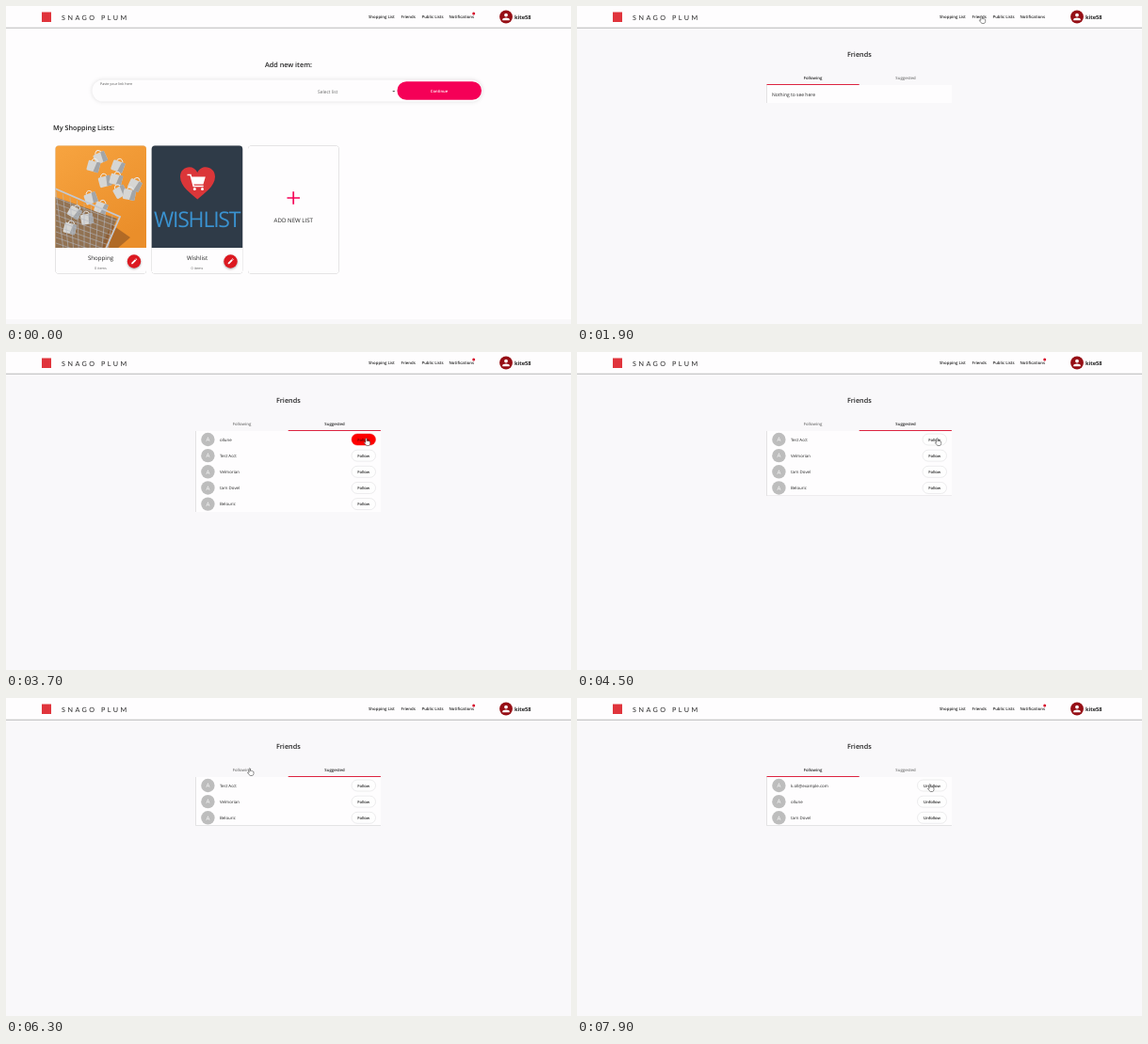
Write an HTML page that moves like this. It is 600 by 338 pixels and loops after 8 s.

```html
<!DOCTYPE html>
<html lang="en">
<head>
<meta charset="utf-8">
<title>Shopping lists</title>
<style>
  html, body { margin: 0; width: 100%; height: 100%; overflow: hidden; }
  svg { display: block; width: 600px; height: 338px; font-family: "Open Sans", sans-serif; fill: #222; text-rendering: geometricPrecision; }
  .brand { font: 7.2px Lato, sans-serif; letter-spacing: 2.5px; }
  .poster { font-stretch: 75%; letter-spacing: -1.2px; }
  .card { fill: #fefdfe; filter: drop-shadow(0 .5px .7px #0006); }
  .soft { fill: #fefdfe; filter: drop-shadow(0 0 2px #0002); }
</style>
</head>
<body>
<svg id="stage" viewBox="0 0 600 338">
  <defs>
    <clipPath id="photo"><path d="M52.500 257V152a3.500 3.500 0 0 1 3.500-3.500h89.500a3.500 3.500 0 0 1 3.500 3.500v105z"/></clipPath>
    <linearGradient id="orange" x2=".6" y2="1"><stop stop-color="#f7a440"/><stop offset="1" stop-color="#ea8e2a"/></linearGradient>
    <linearGradient id="fade" x2="0" y2="1"><stop stop-color="#999"/><stop offset="1" stop-color="#999" stop-opacity="0"/></linearGradient>
  </defs>
  <rect id="back" width="600" height="338"/>
  <g id="home"></g>
  <g id="friends"></g>
  <g id="header"></g>
  <g id="cursor" stroke="#333" stroke-width=".55" stroke-linejoin="round" fill="#fff">
    <path id="arrow" d="M0 0V6L1.4 4.8 2.4 7 3.4 6.5 2.5 4.4H4.3z"/>
    <path id="hand" d="M-.7 .6Q0 -.5 .7 .6V3Q1.6 2.5 2 3.2 2.9 2.8 3.2 3.6 4.2 3.4 4.2 4.3V6Q4 7.8 2.6 8H.6Q-.5 7.6 -2.3 4.8 -2 3.8 -.7 4.8z"/>
  </g>
</svg>
<script>
const $ = id => document.getElementById(id);
const PINK = '#f50057', RED = '#dc1820';

const text = (x, y, size, str, extra = '') => `<text x="${x}" y="${y}" font-size="${size}" ${extra}>${str}</text>`;
const mid = (x, y, size, str, extra = '') => text(x, y, size, str, 'text-anchor="middle" ' + extra);
const rect = (x, y, w, h, r, attrs) => `<rect x="${x}" y="${y}" width="${w}" height="${h}" rx="${r}" ${attrs}/>`;
const circle = (x, y, r, fill) => `<circle cx="${x}" cy="${y}" r="${r}" fill="${fill}"/>`;
const path = (d, attrs) => `<path d="${d}" ${attrs}/>`;
const semi = 'font-weight="600"';

function header() {
  const nav = [[385, 'Shopping List'], [419.5, 'Friends'], [441.5, 'Public Lists'], [470.5, 'Notifications']];
  return rect(0, 22.6, 600, 1.8, 0, 'fill="url(#fade)"') + rect(0, 0, 600, 22.6, 0, 'fill="#fefdfe"') +
    rect(38, 6.5, 10, 10.5, 0, 'fill="#e0343c"') +
    text(59, 14.8, 7.2, 'SNAGO PLUM', 'class="brand"') +
    nav.map(([x, s]) => text(x, 13.3, 4.3, s, semi)).join('') +
    `<g id="badge">${circle(496.7, 8, 1.5, '#d8142c')}</g>` +
    circle(531, 11.5, 6.9, '#960f16') + circle(531, 9.6, 1.9, '#fff') +
    path('M527.3 15.2v-1q0-1.8 3.7-1.8t3.7 1.8v1z', 'fill="#fff"') +
    text(540, 13.7, 5.7, 'kite58', 'font-weight="700"');
}

function photo() {
  const bags = [[100, 161, -25], [93, 170, 15], [119, 170, 20], [105, 186, -15], [117, 184, 15], [137, 190, 25],
    [121, 197, -30], [131, 200, 10], [90, 204, -20], [101, 214, 20], [73, 219, 30], [86, 226, -10], [68, 236, 15]];
  let wires = '';
  for (let i = 0; i < 9; i++) wires += `M${53 + i * 7.5} ${197 + i * 3.2}l${8 - i * 2} 62M53 ${204 + i * 6}L${119 - i * 2} ${229 + i * 5}`;
  return `<g clip-path="url(#photo)">` + rect(52, 148, 97, 110, 0, 'fill="url(#orange)"') +
    path('M52 203L118 226 104 258H52z', 'fill="#6b6462" opacity=".7"') +
    path('M112 232L132 246 118 258H100z', 'fill="#8a5224" opacity=".6"') +
    bags.map(([x, y, a]) => `<g transform="translate(${x} ${y}) rotate(${a})">` +
      path('M-3-4v-2q3-4 6 0v2', 'fill="none" stroke="#eee" stroke-width=".9"') +
      rect(-6.5, -5, 13, 11, 1.5, 'fill="#d6d6d4"') + path('M2.5-5h4V6H1z', 'fill="#a3a5a7"') + '</g>').join('') +
    path(wires, 'fill="none" stroke="#b4b8c0" stroke-width=".8" opacity=".75"') +
    path('M52 194L121 224 106 258', 'fill="none" stroke="#c4c8d0" stroke-width="1.8"') + '</g>';
}

function poster() {
  return path('M154.700 257V152a3.500 3.500 0 0 1 3.500-3.500H247.700a3.500 3.500 0 0 1 3.500 3.500v105z', 'fill="#2f3b48"') +
    path('M203.300 205.500C197 199.500 185 192 185 181.500c0-11 14-14 18.300-4.500C207.600 167.500 222 170.500 222 181.500c0 10.500-12.400 18-18.700 24z', 'fill="#db3639"') +
    path('M192.500 179.500h3.500l3.200 12h10.500', 'fill="none" stroke="#fff" stroke-width="1.500"') +
    path('M196.800 181.500h15l-2.300 8h-11z', 'fill="#fff"') + circle(200.3, 194.5, 1.5, '#fff') + circle(208.5, 194.5, 1.5, '#fff') +
    mid(202.6, 234.5, 23, 'WISHLIST', 'class="poster" fill="#3a92d0"');
}

function home() {
  const card = x => rect(x, 148.5, 96.5, 136, 3.5, 'class="card"');
  const label = (x, name) => mid(x, 270, 6.15, name) + mid(x, 279.7, 3.75, '0 items', 'fill="#666"') +
    `<g transform="translate(${x + 35.5} 271.5)"><g filter="drop-shadow(0 1px 1px #0005)">${circle(0, 0, 7.2, RED)}</g>` +
    path('M-2.800 2.800v-1.300L1-2.300 2.300-1-1.500 2.800zM1.400-2.700l.7-.6 1.200 1.200-.6.7z', 'fill="#fff"') + '</g>';
  return rect(0, 333, 600, 5, 0, 'fill="#f8f7f9"') +
    mid(300, 64.8, 7.25, 'Add new item:', semi) +
    rect(91.5, 78.5, 414, 23, 11.5, 'class="soft"') +
    text(100, 84.2, 3.7, 'Paste your link here', 'fill="#555"') +
    text(331, 93, 4.9, 'Select list', 'fill="#666"') +
    path('M410.200 90h3.200l-1.600 1.600z', 'fill="#555"') +
    rect(415.4, 80.2, 89.6, 19.6, 9.8, `fill="${PINK}"`) + mid(460, 91.5, 4.2, 'Continue', semi + ' fill="#fff"') +
    text(50, 132, 7.25, 'My Shopping Lists:', semi) +
    card(52.5) + card(154.7) + card(257) + photo() + poster() +
    label(100.5, 'Shopping') + label(203, 'Wishlist') +
    path('M298.500 204h13.500M305.200 197.300v13.500', `stroke="${PINK}" stroke-width="1.700"`) +
    mid(305.3, 229.8, 6.15, 'ADD NEW LIST');
}

const people = ['ollune', 'Test Acct', 'Velmorian', 'tarn Dovel', 'Belouric'];
const followed = ['Nella', 'k.oll@example.com', 'ollune', 'tarn Dovel'];
const OPEN = 1790, SUGGEST = 3090, FIRST = 4090, SECOND = 5790, FOLLOWING = 6490, REMOVE = 7890;
const hovers = [[3600, FIRST, 0], [5200, SECOND, 2], [7400, REMOVE, 0]]; // from, to, row

const clamp = v => Math.max(0, Math.min(1, v));
const ease = v => (v = clamp(v), v * v * (3 - 2 * v));

function listAt(t) {
  if (t < SUGGEST) return [];
  if (t < FOLLOWING) return people.filter((_, i) => !(i === 0 && t >= FIRST) && !(i === 3 && t >= SECOND));
  return t < REMOVE ? followed : followed.slice(1);
}

function friends(t) {
  const names = listAt(t), suggested = t >= SUGGEST && t < FOLLOWING;
  const slide = ease((t - SUGGEST) / 300) - ease((t - FOLLOWING) / 300);
  const tab = (x, name, on) => mid(x, 77.5, 4.3, name, `${semi} fill="${on ? '#222' : '#777'}"`);
  const row = (name, i) => {
    const y = 93 + i * 17.15, w = suggested ? 25.5 : 31;
    const hover = hovers.find(([from, to, r]) => r === i && t >= from && t < to);
    const pale = hover ? Math.round(255 * (1 - clamp((t - hover[0]) / 90))) : 254;
    return circle(214.4, y, 7.2, '#bdbdbd') + mid(214.4, y + 2.2, 6.2, 'A', 'fill="#fff"') +
      text(227, y + 1.6, 4.4, name) +
      rect(392.5 - w, y - 6, w, 12, 6, `fill="rgb(254,${pale},${pale})" stroke="${hover ? '#f01414' : '#d8d8da'}" stroke-width=".5"`) +
      mid(392.5 - w / 2, y + 1.5, 4.15, suggested ? 'Follow' : 'Unfollow', `${semi} fill="${hover ? '#500' : '#222'}"`);
  };
  return mid(299.8, 53.6, 7.25, 'Friends', semi) +
    tab(250.5, 'Following', !suggested) + tab(349, 'Suggested', suggested) +
    rect(201.5, 84, 196.5, names.length ? names.length * 17.2 : 19, 0, 'class="card"') +
    rect(201.5 + 98.2 * slide, 83, 98.2, 1, 0, 'fill="#dc2440"') +
    (names.length ? names.map(row).join('') : text(207, 95.6, 5, 'Nothing to see here'));
}

// time, x, y of the pointer tip
const route = [[500, 440, 175], [900, 417, 44], [1000, 415.3, 31], [1300, 429.5, 10.5], [2000, 429.5, 10.5],
  [2600, 386, 86], [2750, 347, 74.5], [3100, 347, 74.5], [3600, 382.5, 91.5], [4850, 382.5, 91.5],
  [5000, 358, 108], [5200, 384, 125.5], [5800, 384, 125.5], [6250, 258.8, 74.5], [6500, 258.8, 74.5],
  [7300, 374.8, 91.5], [8000, 374.8, 91.5]];

function moveCursor(t) {
  const shown = t >= route[0][0];
  $('cursor').style.display = shown ? '' : 'none';
  if (!shown) return;
  const i = route.findIndex(p => p[0] > t), [t0, x0, y0] = route[i - 1], [t1, x1, y1] = route[i];
  const k = ease((t - t0) / (t1 - t0)), x = x0 + (x1 - x0) * k, y = y0 + (y1 - y0) * k;
  const hand = y < 18 || (t > OPEN && y > 66 && y < 83 && x > 201 && x < 398) || (t > SUGGEST && x > 361 && y > 86);
  $('cursor').setAttribute('transform', `translate(${x} ${y})`);
  $('hand').style.display = hand ? '' : 'none';
  $('arrow').style.display = hand ? 'none' : '';
}

$('header').innerHTML = header();
$('home').innerHTML = home();
let drawn;

function frame() {
  const t = performance.now() % 8000, atHome = t < OPEN;
  $('back').setAttribute('fill', atHome ? '#fefdfe' : '#f9f8fa');
  $('home').style.display = atHome ? '' : 'none';
  $('badge').style.display = t >= OPEN && t < 2200 ? 'none' : '';
  const page = atHome ? '' : friends(t);
  if (page !== drawn) $('friends').innerHTML = drawn = page;
  moveCursor(t);
  requestAnimationFrame(frame);
}
frame();
</script>
</body>
</html>
```
